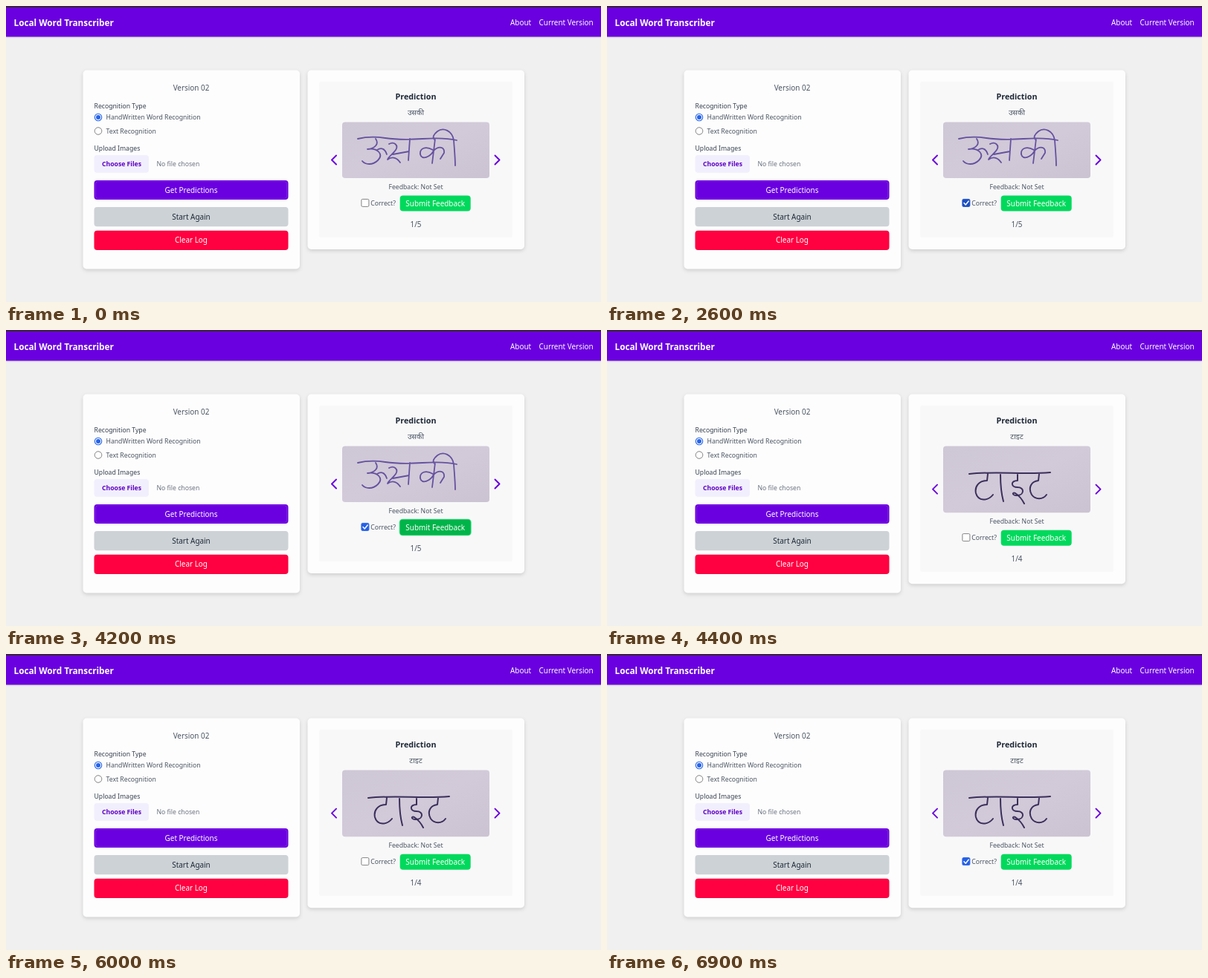
Recreate the animation shown at these times as an HTML page. Size 800 px wide and 399 px high, loop 8000 ms.

```html
<!DOCTYPE html>
<html lang="en">
<head>
<meta charset="utf-8">
<title>Word recognition</title>
<style>
  html, body { margin: 0; width: 100%; height: 100%; overflow: hidden; background: #f0f0f1; }
  svg { display: block; width: 100%; height: 100%; }
  text { font: 8.66px "Noto Sans", "Open Sans", sans-serif; fill: #4b5563; }
  .base { font-size: 9.92px; }
  .mid { text-anchor: middle; }
  .bold { font-weight: 700; }
  .dark { fill: #1f2937; }
  .light { fill: #fff; }
  .card { fill: #fdfdfd; filter: drop-shadow(0 2px 2.5px rgba(0, 0, 0, .14)); }
  .stroke { fill: none; stroke-linecap: round; stroke-linejoin: round; }
  .chevron { stroke: #6a00df; stroke-width: 2; }
  .script { font-family: "Noto Sans Devanagari", "Noto Sans", sans-serif; }
</style>
</head>
<body>
<svg viewBox="0 0 800 399">
  <defs>
    <linearGradient id="paper" x1="0" y1="0" x2="1" y2="1">
      <stop offset="0" stop-color="#cec7d5"/>
      <stop offset=".5" stop-color="#d2cad9"/>
      <stop offset="1" stop-color="#cbc3d2"/>
    </linearGradient>
  </defs>

  <rect width="800" height="399" fill="#f0f0f1"/>
  <rect width="800" height="41.5" fill="#6a00df" style="filter:drop-shadow(0 1px 1px rgba(0,0,0,.12))"/>
  <rect width="800" height="2" fill="#3b2438"/>
  <text class="bold light" x="10.5" y="26.5" style="font-size:11.75px">Local Word Transcriber</text>
  <text class="base light" x="678" y="26">About</text>
  <text class="base light" x="716.5" y="26">Current Version</text>

  <rect class="card" x="103.5" y="86.5" width="291.5" height="268" rx="5"/>
  <text class="base mid" x="249" y="113.7">Version 02</text>
  <text x="118.5" y="137.8" style="fill:#374151">Recognition Type</text>
  <circle cx="124" cy="150" r="4.7" fill="#fff" stroke="#2563eb" stroke-width="1.1"/>
  <circle cx="124" cy="150" r="3" fill="#2563eb"/>
  <text x="134.5" y="153.4">HandWritten Word Recognition</text>
  <circle cx="124" cy="168.5" r="4.8" fill="#fff" stroke="#767676" stroke-width=".9"/>
  <text x="134.5" y="171.8">Text Recognition</text>
  <text x="118.5" y="194.8" style="fill:#374151">Upload Images</text>
  <rect x="118.5" y="201" width="73.5" height="23.7" rx="4" fill="#f1effd"/>
  <text class="bold mid" x="155.5" y="215.8" style="fill:#6000c4">Choose Files</text>
  <text x="202.5" y="215.8" style="fill:#6b7280">No file chosen</text>
  <rect x="118.5" y="235" width="261" height="26" rx="4" fill="#6a00df"/>
  <rect x="120.5" y="236.5" width="257" height="23" rx="3" fill="none" stroke="#fff" stroke-opacity=".18" stroke-width=".7"/>
  <text class="base mid light" x="249" y="251.6">Get Predictions</text>
  <rect x="118.5" y="271" width="261" height="26.3" rx="4" fill="#cdd2d6"/>
  <text class="base mid dark" x="249" y="287.8">Start Again</text>
  <rect x="118.5" y="302.7" width="261" height="26.3" rx="4" fill="#ff0040"/>
  <text class="base mid light" x="249" y="319.4">Clear Log</text>

  <rect class="card" id="card" x="405.5" y="86.5" width="291.5" height="241.5" rx="5"/>
  <rect id="panel" x="421" y="102" width="260" height="210" rx="3" fill="#f8f8f9"/>
  <text class="bold mid dark" x="551" y="125.6" style="font-size:10.75px">Prediction</text>
  <rect id="photo" x="452" y="156.5" width="198" height="75.5" rx="4" fill="url(#paper)"/>
  <g id="words"></g>

  <g id="arrows" class="stroke">
    <path class="chevron" d="M444 201.5l-6 6 6 6"/>
    <path class="chevron" id="next" d="M657.5 201.5l6 6-6 6"/>
  </g>

  <g id="lower">
    <text class="mid" x="551" y="246.5">Feedback: Not Set</text>
    <rect id="box" x="477.9" y="260.4" width="10" height="10" rx="1.5" stroke-width=".9"/>
    <path id="tick" class="stroke" d="M480 265.6l2.2 2.4 4-5" stroke="#fff" stroke-width="1.5"/>
    <text x="490.3" y="268.8">Correct?</text>
    <rect id="ring" x="528.7" y="254.7" width="97" height="22.6" rx="4.5" fill="#3ce583"/>
    <rect id="submit" x="529.7" y="255.5" width="95" height="21" rx="4"/>
    <text class="base mid light" x="577.2" y="269.6">Submit Feedback</text>
    <text class="base mid" id="count" x="551" y="298.2"></text>
  </g>
</svg>

<script>
const LOOP = 8000;
const $ = id => document.getElementById(id);

const words = [
  {
    text: 'उसकी', cx: 540, top: 179, ink: '#65519f', pen: 1.8,
    path: 'M473 179Q490 175 510 178T560 179T606 181' +
      'M497 179C502 186 496 192 486 193C500 191 508 200 500 208C493 215 483 214 479 209M499 194C505 190 510 193 512 200' +
      'M515 186C522 182 528 188 524 194C520 200 514 203 513 207C520 202 526 205 530 211M520 200L542 196M543 179L541 208' +
      'M577 179L573 212M574 194C564 188 556 192 557 200C559 208 570 204 575 195C582 188 590 190 589 198L584 206' +
      'M604 215C604 205 603 195 602 181C600 168 588 163 580 169C575 173 573 177 576 180'
  },
  {
    text: 'टाइट', cx: 541.5, top: 193, ink: '#3b2f5b', pen: 2,
    path: 'M487 194C520 190 560 195 596 192' +
      'M512 194L511 203C500 203 494 211 496 220C499 231 512 231 519 222' +
      'M529 195C529 208 530 220 533 231' +
      'M552 195V203C542 203 543 212 552 212C562 212 561 223 551 223C544 223 545 218 549 220C555 224 559 230 561 234' +
      'M581 194L580 203C570 204 566 213 571 222C576 229 586 229 591 222'
  }
];

// Without a Devanagari font the caption is drawn with pen strokes.
const pen = document.createElement('canvas').getContext('2d');
pen.font = '40px "Noto Sans Devanagari", "Noto Sans", sans-serif';
const hasScript = pen.measureText('उ').width !== pen.measureText('\u0378').width;

$('words').innerHTML = words.map(w => {
  const caption = hasScript
    ? `<text class="mid script" x="551" y="147.3" style="font-size:9.92px">${w.text}</text>`
    : `<path class="stroke" d="${w.path}" stroke="#4b5563" stroke-width="6"
        transform="translate(551 141) scale(.175) translate(${-w.cx} ${-w.top})"/>`;
  return `<g>${caption}<path class="stroke" d="${w.path}" stroke="${w.ink}" stroke-width="${w.pen}"/></g>`;
}).join('');

// Each step holds until the next one: [time, value]
const tracks = {
  word: [[0, 0], [4400, 1]],
  check: [[0, 'off'], [1700, 'hover'], [1800, 'onHover'], [2800, 'on'], [4400, 'off'], [6800, 'onHover'], [6900, 'on']],
  arrow: [[0, '#6a00df'], [3000, '#5200ad'], [3600, '#6a00df'], [5000, '#5200ad'], [5200, '#6a00df']],
  button: [[0, '#00d95c'], [3800, '#00c653'], [3900, '#00b44a'], [4400, '#00d95c']],
  ring: [[0, 0], [4200, 1], [4400, 0]]
};
const boxes = {
  off: ['#fff', '#767676'],
  hover: ['#fff', '#4f4f4f'],
  onHover: ['#1b4fc4', '#1b4fc4'],
  on: ['#2460e8', '#2460e8']
};
const at = (track, t) => track.findLast(step => step[0] <= t)[1];
const set = (id, attrs) => {
  for (const name in attrs) $(id).setAttribute(name, attrs[name]);
};

function draw(t) {
  const word = at(tracks.word, t);
  const check = at(tracks.check, t);
  const [fill, stroke] = boxes[check];
  const drop = word * 14.2;

  [...$('words').children].forEach((g, i) => g.setAttribute('visibility', i === word ? 'visible' : 'hidden'));
  set('card', { height: 241.5 + drop });
  set('panel', { height: 210 + drop });
  set('photo', { height: 75.5 + drop });
  set('arrows', { transform: `translate(0 ${drop / 2})` });
  set('lower', { transform: `translate(0 ${drop})` });
  set('box', { fill, stroke });
  set('tick', { opacity: check.startsWith('on') ? 1 : 0 });
  set('submit', { fill: at(tracks.button, t) });
  set('ring', { opacity: at(tracks.ring, t) });
  $('next').style.stroke = at(tracks.arrow, t);
  $('count').textContent = word ? '1/4' : '1/5';
}

const start = performance.now();
function frame() {
  draw((performance.now() - start) % LOOP);
  requestAnimationFrame(frame);
}
frame();
</script>
</body>
</html>
```
